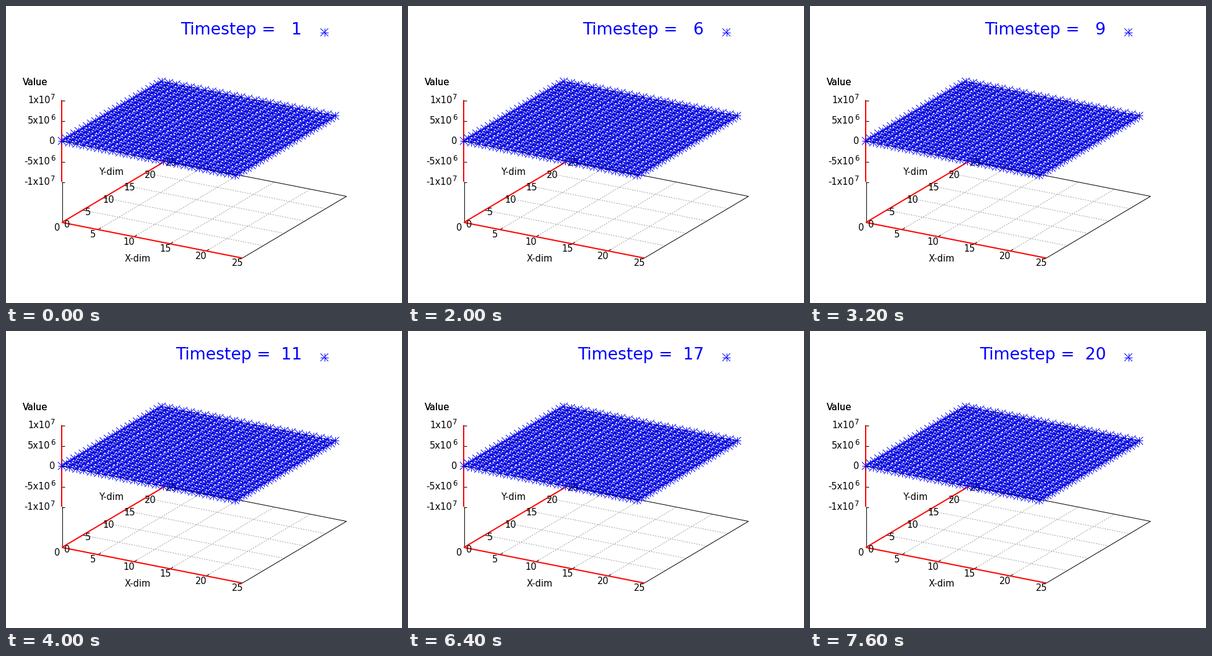
Recreate the animation shown at these times as a matplotlib script. Size 640 by 480 pixels, loop 8000 ms.

```python
import numpy as np
import matplotlib.pyplot as plt
from matplotlib.animation import FuncAnimation
from matplotlib.collections import LineCollection

STEPS, STEP_MS = 20, 400
PX = 0.72  # points per pixel at 100 dpi
BLUE = "#0000ff"
SMALL, LARGE = 14.67, 26.67

# Projected axes in pixels, y pointing down
ORIGIN = np.array([90.3, 349.8])
X_UNIT = np.array([291.7, 57.6]) / 25
Y_UNIT = np.array([168.3, -99.8]) / 25
Z_ZERO = 218  # screen height of value 0 on the vertical axis
Z_STEP = 33   # pixels per 5e6

plt.rcParams["font.family"] = "DejaVu Sans"
fig = plt.figure(figsize=(6.4, 4.8), dpi=100, facecolor="white")
ax = fig.add_axes([0, 0, 1, 1])
ax.set(xlim=(0, 640), ylim=(480, 0))
ax.axis("off")


def floor(x, y):
    return ORIGIN + x * X_UNIT + y * Y_UNIT


def surface(x, y):
    return floor(x, y) + (0, Z_ZERO - ORIGIN[1])


def lines(segments, color="black", width=1.0, z=1, **style):
    ax.add_collection(LineCollection(segments, colors=color,
                                     linewidths=width * PX, zorder=z, **style))


def label(x, baseline, text, size=SMALL, ha="center", color="black"):
    return ax.text(x, baseline, text, fontsize=size * PX, ha=ha,
                   va="baseline", color=color, zorder=4)


def star(center, r=6.3):
    arms = [(r, 0), (0, r), (r, r), (r, -r)]
    return [(center - np.array(a), center + np.array(a)) for a in arms]


def draw_floor():
    inner = range(5, 25, 5)
    grid = [(floor(v, 0), floor(v, 25)) for v in inner]
    grid += [(floor(0, v), floor(25, v)) for v in inner]
    lines(grid, "#a0a0a0", linestyles=[(0, (2, 2))])
    lines([(floor(25, 0), floor(25, 25)), (floor(0, 25), floor(25, 25)),
           ((90.5, 284), (90.5, 350))])
    ticks = [(floor(v, 0), floor(v, 0.7)) for v in inner]
    ticks += [(floor(0, v), floor(0.45, v)) for v in inner]
    lines(ticks)
    lines([(floor(0, 0), floor(25, 0)), (floor(0, 0), floor(0, 25)),
           ((90, Z_ZERO - 2 * Z_STEP), (90, Z_ZERO + 2 * Z_STEP))],
          "red", 2, z=2)
    for v in range(0, 26, 5):
        x, y = floor(v, 0)
        label(x - 8, y + 13, str(v))
        x, y = floor(0, v)
        label(x + 8.2, y + 8.3, str(v)).set_zorder(2.5)


def draw_z_axis():
    for n in (-2, -1, 0, 1, 2):
        y = Z_ZERO - n * Z_STEP
        lines([((90, y + 0.5), (95, y + 0.5))], z=1.5)
        if n == 0:
            label(74.5, y + 5.3, "0")
            continue
        mantissa, power = (1, 7) if abs(n) == 2 else (5, 6)
        sign = "-" if n < 0 else ""
        label(29.7 if sign else 35, y + 5.3, f"{sign}{mantissa}x10", ha="left")
        label(72, y - 0.7, str(power), SMALL * 0.8, ha="left")


def draw_surface():
    ids = range(25)
    mesh = [(surface(0, v), surface(24, v)) for v in ids]
    mesh += [(surface(v, 0), surface(v, 24)) for v in ids]
    lines(mesh, z=3)
    stars = [arm for i in ids for j in ids for arm in star(surface(i, j))]
    lines(stars, BLUE, z=3.5)


draw_floor()
draw_z_axis()
draw_surface()
lines(star(np.array([514.5, 42.5])), BLUE, z=4)
label(212.5, 413, "X-dim")
label(170, 273, "Y-dim")
for _ in range(2):
    label(47, 127.5, "Value")
title = label(282.4, 46, "", LARGE, "left", BLUE)


def update(frame):
    step = frame + 1
    title.set_text(f"Timestep = {step:3d}")
    title.set_x(282.4 if step < 10 else 273.9)
    return [title]


anim = FuncAnimation(fig, update, frames=STEPS, interval=STEP_MS,
                     repeat=True, repeat_delay=0)
plt.show()
```
